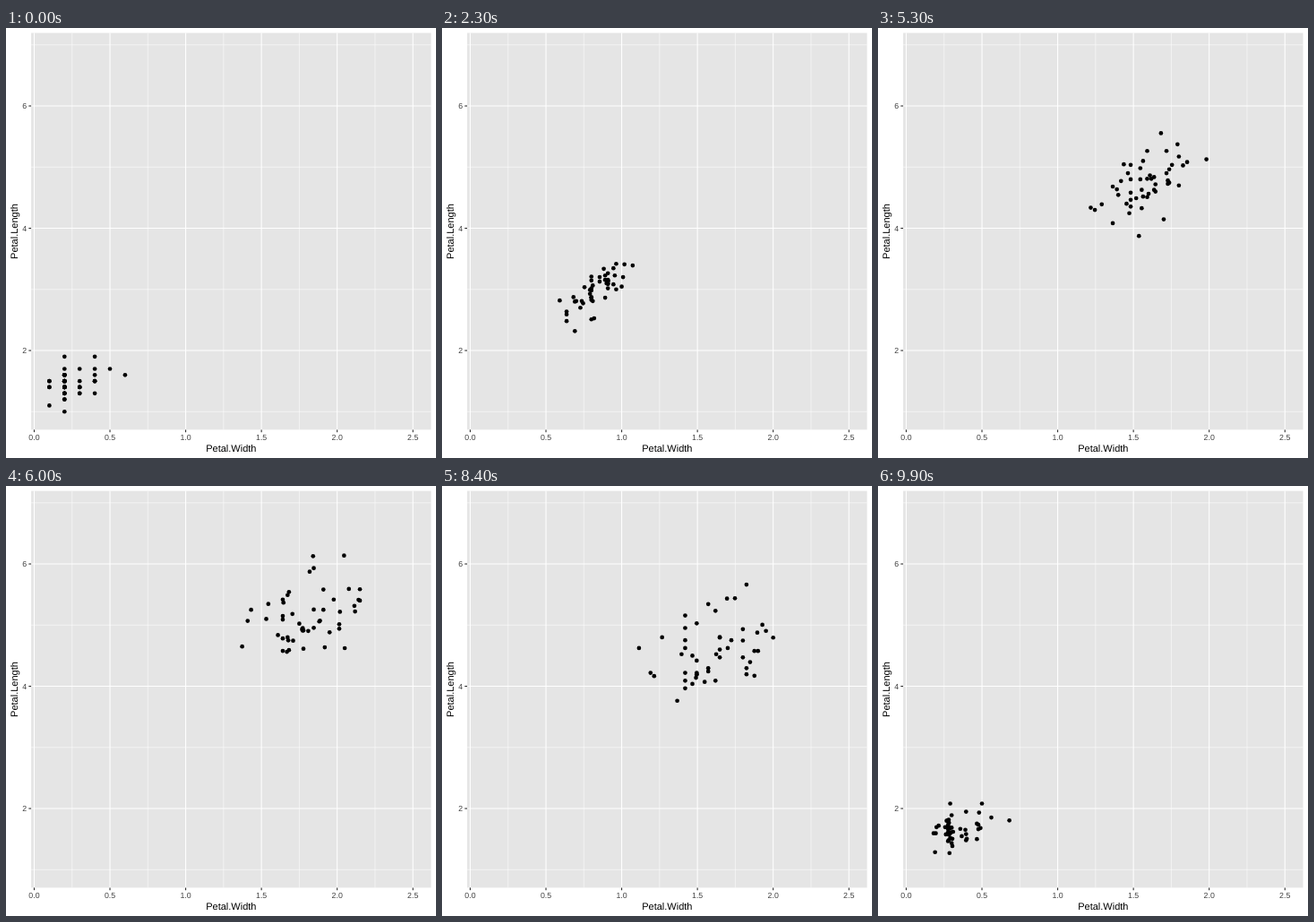
An HTML page that plays this animation: 480 px wide and 480 px high, repeating every 10000 ms.

```html
<!DOCTYPE html>
<html lang="en">
<head>
<meta charset="utf-8">
<title>Petal scatter plot</title>
<style>
  html, body { margin: 0; width: 100%; height: 100%; overflow: hidden; background: #fff; }
  svg { display: block; width: 100%; height: 100%; }
  text { font: 8.8px "Liberation Sans", Arial, sans-serif; fill: #404040; text-rendering: geometricPrecision; }
  .title { font-size: 11px; fill: #000; text-anchor: middle; }
  .panel { fill: #e5e5e5; }
  .minor { stroke: #fff; stroke-width: .53; }
  .major { stroke: #fff; stroke-width: 1.07; }
  .tick { stroke: #272727; stroke-width: 1.07; }
  .xlab { text-anchor: middle; }
  .ylab { text-anchor: end; }
  /* the small delay keeps steps clear of exact 100 ms boundaries */
  circle { r: 2.35px; animation: states 10s -5ms infinite; }
  @keyframes states {
    0%  { cx: var(--x0); cy: var(--y0); animation-timing-function: step-end; }
    11% { cx: var(--x0); cy: var(--y0); animation-timing-function: steps(22); }
    33% { cx: var(--x1); cy: var(--y1); animation-timing-function: step-end; }
    45% { cx: var(--x1); cy: var(--y1); animation-timing-function: steps(22); }
    67% { cx: var(--x2); cy: var(--y2); animation-timing-function: step-end; }
    79% { cx: var(--x2); cy: var(--y2); animation-timing-function: steps(21); }
    100% { cx: var(--x0); cy: var(--y0); }
  }
</style>
</head>
<body>
<svg viewBox="0 0 480 480">
  <rect class="panel" x="28.1" y="5.5" width="446.4" height="442.9"/>
  <g id="grid"></g>
  <g id="points"></g>
  <text class="title" x="251.3" y="473">Petal.Width</text>
  <text class="title" transform="translate(13.3 227) rotate(-90)">Petal.Length</text>
</svg>
<script>
const box = { left: 28.1, top: 5.5, right: 474.5, bottom: 448.4 };
const px = v => box.left + (v + .02) * 169.1;
const py = v => box.bottom - (v - .705) * 68.25;
const grid = document.getElementById('grid');
const points = document.getElementById('points');

function add(parent, tag, attrs, text = '') {
  const el = document.createElementNS('http://www.w3.org/2000/svg', tag);
  for (const key in attrs) el.setAttribute(key, attrs[key]);
  el.textContent = text;
  parent.append(el);
  return el;
}
const line = (cls, x1, y1, x2, y2) => add(grid, 'line', { class: cls, x1, y1, x2, y2 });
const vLine = (cls, v) => line(cls, px(v), box.top, px(v), box.bottom);
const hLine = (cls, v) => line(cls, box.left, py(v), box.right, py(v));

[1, 3, 5, 7].forEach(v => hLine('minor', v));
[.25, .75, 1.25, 1.75, 2.25].forEach(v => vLine('minor', v));
for (const v of [2, 4, 6]) {
  hLine('major', v);
  line('tick', box.left - 2.75, py(v), box.left, py(v));
  add(grid, 'text', { class: 'ylab', x: 23.1, y: py(v) + 3.2 }, v);
}
for (const v of [0, .5, 1, 1.5, 2, 2.5]) {
  vLine('major', v);
  line('tick', px(v), box.bottom, px(v), box.bottom + 2.75);
  add(grid, 'text', { class: 'xlab', x: px(v), y: 459.7 }, v.toFixed(1));
}

// Petal sizes per species, in millimetres
const species = [
  {
    width: [2,2,2,2,2,4,3,2,2,1,2,2,1,1,2,4,4,3,3,3,2,4,2,5,2,
            2,4,2,2,2,2,4,1,2,2,2,2,1,2,2,3,3,2,6,4,3,2,2,2,2],
    length: [14,14,13,15,14,17,14,15,14,15,15,16,14,11,12,15,13,14,17,15,17,15,10,17,19,
             16,16,15,14,16,16,15,15,14,15,12,13,14,13,15,13,13,13,16,19,14,16,14,15,14]
  },
  {
    width: [14,15,15,13,15,13,16,10,13,14,10,15,10,14,13,14,15,10,15,11,18,13,15,12,13,
            14,14,17,15,10,11,10,12,16,15,16,15,13,13,13,12,14,12,10,13,12,13,13,11,13],
    length: [47,45,49,40,46,45,47,33,46,39,35,42,40,47,36,44,45,41,45,39,48,40,49,47,43,
             44,48,50,45,35,38,37,39,51,45,45,47,44,41,40,44,46,40,33,42,42,42,43,30,41]
  },
  {
    width: [25,19,21,18,22,21,17,18,18,25,20,19,21,20,24,23,18,22,23,15,23,20,20,18,21,
            18,18,18,21,16,19,20,22,15,14,23,24,18,18,21,24,23,19,23,25,23,19,20,23,18],
    length: [60,51,59,56,58,66,45,63,58,61,51,53,55,50,51,53,55,67,69,50,57,49,67,49,57,
             60,48,49,56,58,61,64,56,51,56,61,56,55,48,54,56,51,51,59,57,52,50,52,54,51]
  }
];

for (let i = 0; i < 50; i++) {
  const dot = add(points, 'circle', {});
  species.forEach(({ width, length }, s) => {
    dot.style.setProperty('--x' + s, px(width[i] / 10) + 'px');
    dot.style.setProperty('--y' + s, py(length[i] / 10) + 'px');
  });
}
</script>
</body>
</html>
```
